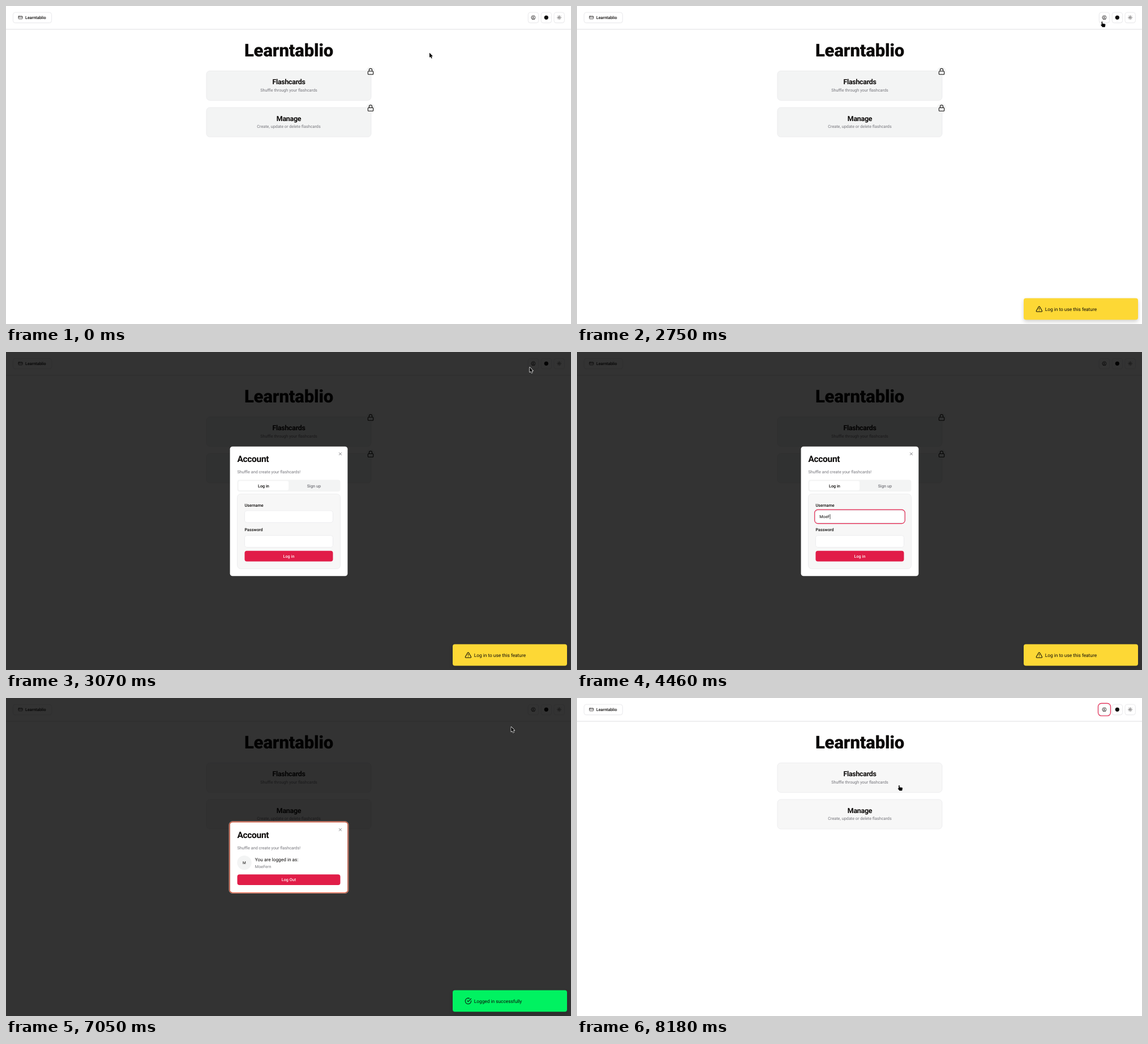
An HTML page with a canvas that plays this animation: 998x561 px, repeating every 8260 ms.

```html
<!DOCTYPE html>
<html lang="en">
<head>
<meta charset="utf-8">
<title>Flashcards login</title>
<style>
html, body { margin: 0; width: 100%; height: 100%; overflow: hidden; background: #fff; }
canvas { display: block; width: 998px; height: 561px; }
</style>
</head>
<body>
<canvas id="stage" width="998" height="561"></canvas>
<script>
const W = 998, H = 561, LOOP = 8260, STEP = 80;
const APP = 'Learntablio', USER = 'MoeFern';
const INK = '#0c0a09', GREY = '#76767c', LINE = '#e4e4e7', MUTED = '#f3f4f4',
      PANEL = '#f7f7f7', RED = '#e11d48';

const stage = document.getElementById('stage').getContext('2d');
const layer = Object.assign(document.createElement('canvas'), { width: W, height: H });
const dialogCtx = layer.getContext('2d');
let g = stage;

const ICONS = {
  card: 'M4 5H20a2 2 0 0 1 2 2V17a2 2 0 0 1-2 2H4a2 2 0 0 1-2-2V7a2 2 0 0 1 2-2ZM2 10h20',
  lock: 'M5 11H19a2 2 0 0 1 2 2v7a2 2 0 0 1-2 2H5a2 2 0 0 1-2-2v-7a2 2 0 0 1 2-2ZM7 11V7a5 5 0 0 1 10 0v4',
  user: 'M2 12a10 10 0 1 1 20 0a10 10 0 1 1-20 0M9 10a3 3 0 1 1 6 0a3 3 0 1 1-6 0M7 20.7V19a2 2 0 0 1 2-2h6a2 2 0 0 1 2 2v1.7',
  sun: 'M8 12a4 4 0 1 1 8 0a4 4 0 1 1-8 0M12 2v2M12 20v2M2 12h2M20 12h2M4.9 4.9l1.4 1.4M17.7 17.7l1.4 1.4M4.9 19.1l1.4-1.4M17.7 6.3l1.4-1.4',
  close: 'M18 6 6 18M6 6l12 12',
  spinner: 'M21 12a9 9 0 1 1-6.2-8.56',
  warn: 'm21.73 18-8-14a2 2 0 0 0-3.48 0l-8 14A2 2 0 0 0 4 21h16a2 2 0 0 0 1.73-3ZM12 9v4M12 17h.01',
  check: 'M22 11.08V12a10 10 0 1 1-5.93-9.14M22 4 12 14.01l-3-3'
};
for (const name in ICONS) ICONS[name] = new Path2D(ICONS[name]);

const ARROW = new Path2D('M0 0V8.5L1.9 6.8 3.4 10 4.8 9.4 3.4 6.3H6Z');
const HAND = new Path2D('M1.6 1Q2.4 -.3 3.2 1V4L7.6 4.7Q8.6 5 8.4 6.3L7.6 10.2H3L.2 6.6Q-.2 5.4 1.6 6Z');

const clamp = v => Math.min(1, Math.max(0, v));
const ease = p => p * p * (3 - 2 * p);
const mix = (a, b, p) => a + (b - a) * p;

function box(x, y, w, h, r, fill, stroke, lineWidth = 0.6) {
  g.beginPath();
  g.roundRect(x, y, w, h, r);
  if (fill) { g.fillStyle = fill; g.fill(); }
  if (stroke) { g.strokeStyle = stroke; g.lineWidth = lineWidth; g.stroke(); }
}

function disc(x, y, r, color) {
  g.fillStyle = color;
  g.beginPath();
  g.arc(x, y, r, 0, 7);
  g.fill();
}

// y is the middle of the capital letters
function text(str, x, y, { size = 7.28, weight = 400, color = INK, align = 'left', track = 0 } = {}) {
  g.font = `${weight} ${size}px Roboto, sans-serif`;
  g.letterSpacing = track + 'px';
  g.textRendering = 'geometricPrecision';
  g.textAlign = align;
  g.fillStyle = color;
  g.fillText(str, x, y + size * 0.35);
}

function icon(name, x, y, size, color = INK, turn = 0) {
  g.save();
  g.translate(x, y);
  g.rotate(turn);
  g.scale(size / 24, size / 24);
  g.translate(-12, -12);
  g.lineWidth = 2;
  g.lineCap = g.lineJoin = 'round';
  g.strokeStyle = color;
  g.stroke(ICONS[name]);
  g.restore();
}

function focusRing(x, y, w, h, r) {
  const gap = 1.85;
  box(x - gap, y - gap, w + 2 * gap, h + 2 * gap, r + gap, null, RED, 1.1);
}

function shadow(color, blur, dy) {
  g.shadowColor = color;
  g.shadowBlur = blur;
  g.shadowOffsetY = dy;
}

function navButton(x, w) {
  g.save();
  shadow('rgba(0,0,0,.06)', 1.5, 0.5);
  box(x, 11.2, w, 18.4, 4, '#fff', LINE);
  g.restore();
}

function menuCard(y, title, note, locked) {
  box(354, y, 291, 52, 6, locked ? MUTED : PANEL, LINE);
  text(title, 499.5, y + 19.6, { size: 12.48, weight: 600, align: 'center', track: -0.31 });
  text(note, 499.5, y + 33.8, { color: GREY, align: 'center' });
  if (locked) {
    disc(644, y + 1, 8, MUTED);
    icon('lock', 644, y + 1, 12.48);
  }
}

function page(locked, userFocused) {
  g.fillStyle = '#fff';
  g.fillRect(0, 0, W, H);
  g.fillStyle = '#dfdfe2';
  g.fillRect(0, 40.6, W, 1);
  navButton(12.5, 68);
  icon('card', 25.5, 20.3, 8.32);
  text(APP, 34, 20.4, { weight: 500 });
  [922.3, 945.2, 968].forEach(x => navButton(x, 18.4));
  icon('user', 931.4, 20.3, 8.32);
  disc(954.3, 20.3, 3.6, INK);
  icon('sun', 977.2, 20.3, 8.32);
  if (userFocused) focusRing(922.3, 11.2, 18.4, 18.4, 4);

  text(APP, 499.5, 78.2, { size: 31.2, weight: 800, align: 'center', track: -0.2 });
  menuCard(114.5, 'Flashcards', 'Shuffle through your flashcards', locked);
  menuCard(179, 'Manage', 'Create, update or delete flashcards', locked);
}

function dialogHead(y, h) {
  box(395.6, y, 207.8, h, 4.5, '#fff');
  text('Account', 408.5, y + 22.3, { size: 15.6, weight: 600, track: -0.39 });
  text('Shuffle and create your flashcards!', 408.5, y + 45.2, { color: GREY });
  icon('close', 590.5, y + 13, 8.32, '#44444a');
}

function caret(x, y) {
  g.fillStyle = INK;
  g.fillRect(x, y - 4.4, 0.7, 8.8);
}

function field(label, y, focused) {
  text(label, 421.5, y - 9.8, { weight: 500 });
  box(421.5, y, 156, 20.8, 4, '#fff', LINE);
  if (focused) focusRing(421.5, y, 156, 20.8, 4);
}

const KEY_TIMES = [4130, 4300, 4300, 4460, 4620, 4780, 4860];

function loginForm(t, now) {
  dialogHead(166.7, 228.6);
  box(408.5, 225.4, 182, 20.8, 4, MUTED);
  box(410.6, 227.5, 88.6, 16.6, 3, '#fff');
  text('Log in', 454.9, 236, { weight: 500, align: 'center' });
  text('Sign up', 543.9, 236, { weight: 500, align: 'center', color: GREY });

  box(408.5, 250.4, 182, 132, 6, PANEL, LINE);
  if (t >= 3400 && t < 3640) focusRing(408.5, 250.4, 182, 132, 6);

  const onName = t >= 3640 && t < 5100, onPassword = t >= 5100;
  field('Username', 280, onName);
  field('Password', 323.7, onPassword);

  const typed = USER.slice(0, KEY_TIMES.filter(k => t >= k).length);
  text(typed, 428.2, 290.5);
  if (onName) caret(428.3 + g.measureText(typed).width, 290.5);
  const dots = t >= 5430 ? 10 : 0;
  for (let i = 0; i < dots; i++) disc(430.6 + i * 4.4, 334.6, 1.75, INK);
  if (onPassword) caret(428.4 + dots * 4.4, 334.4);

  const busy = t >= 5760;
  box(421.5, 350.7, 156, 18.8, 4, busy ? '#ec8a9f' : RED);
  if (busy) icon('spinner', 485.4, 360.1, 8.32, '#fbe9ed', (now - 5760) / 1000 * Math.PI * 2);
  text('Log in', busy ? 507.7 : 499.5, 360.2,
    { weight: 500, align: 'center', color: busy ? '#fbe9ed' : '#fff1f2' });
}

function accountInfo() {
  dialogHead(219.3, 123.6);
  box(394.9, 218.6, 209.2, 125, 5.2, null, '#e95434', 1.2);
  box(394, 217.7, 211, 126.8, 6, null, '#f3c9bd', 0.6);
  disc(421, 290.6, 12.7, MUTED);
  text(USER[0], 421, 290.8, { size: 6.6, align: 'center' });
  text('You are logged in as:', 439.8, 285.2, { size: 8.32 });
  text(USER, 439.8, 297.2, { color: GREY });
  box(408.5, 311.2, 182, 18.8, 4, RED);
  text('Log Out', 499.5, 320.7, { weight: 500, align: 'center', color: '#fff1f2' });
}

function dialog(t, now, shown, loggedIn) {
  stage.fillStyle = `rgba(0,0,0,${0.8 * shown})`;
  stage.fillRect(0, 0, W, H);
  g = dialogCtx;
  g.clearRect(0, 0, W, H);
  g.save();
  const zoom = mix(0.95, 1, shown);
  g.translate(499.5, 281);
  g.scale(zoom, zoom);
  g.translate(-499.5, -281);
  loggedIn ? accountInfo() : loginForm(t, now);
  g.restore();
  g = stage;
  g.globalAlpha = shown;
  g.drawImage(layer, 0, 0);
  g.globalAlpha = 1;
}

function toast(color, glyph, message, dx, dy) {
  g.save();
  g.translate(dx, dy);
  g.save();
  shadow('rgba(0,0,0,.18)', 7, 3.5);
  box(789, 515.6, 202, 38, 4, color);
  g.restore();
  icon(glyph, 816.4, 534.6, 12.48);
  text(message, 826.8, 534.8, { size: 8.32 });
  g.restore();
}

// start, end, from x, from y, to x, to y
const LEGS = [
  [80, 800, 748, 82.5, 651.5, 115.3],
  [1710, 2590, 651.5, 115.3, 917, 32],
  [2590, 2750, 917, 32, 925, 27],
  [6970, 7050, 924, 27, 892.3, 51],
  [7460, 8180, 892.3, 51, 566.6, 153.4]
];

function cursor(t) {
  if (t >= 4130 && t < 6970) return;
  const [a, b, x0, y0, x1, y1] = LEGS.filter(leg => t >= leg[0]).pop() || LEGS[0];
  const p = ease(clamp((t - a) / (b - a)));
  const x = mix(x0, x1, p), y = mix(y0, y1, p);
  const hand = (t >= 2670 && t < 2990) || (t > 7460 && x < 641 && y > 112);
  const shape = hand ? HAND : ARROW;
  g.save();
  g.translate(x, y);
  g.lineJoin = 'round';
  g.lineWidth = 1.3;
  g.strokeStyle = '#fff';
  g.stroke(shape);
  g.fillStyle = '#000';
  g.fill(shape);
  g.restore();
}

// The picture holds for one step at a time, counted from each burst of motion
const BURSTS = [0, 160, 960, 1790, 2670, 2990, 5760, 6970, 7460];
function hold(t) {
  const start = BURSTS.filter(s => t >= s).pop();
  return start + STEP * Math.floor((t - start) / STEP);
}

function draw(now) {
  const t = hold(now);
  const loggedIn = t >= 6480;
  const closing = clamp((t - 7430) / 150);
  const shown = clamp((t - 2950) / 100) * (1 - closing);

  page(!loggedIn, closing === 1);
  if (shown > 0) dialog(now, t, shown, loggedIn);
  if (loggedIn) {
    if (closing < 1)
      toast('#00f261', 'check', 'Logged in successfully', 202 * closing, 38 * (1 - clamp((t - 6435) / 90)));
  } else if (t >= 960) {
    toast('#fdd835', 'warn', 'Log in to use this feature', 0, 38 * (1 - clamp((t - 915) / 90)));
  }
  cursor(now >= 4130 && now < 6970 ? now : t);
}

const origin = performance.now();
function tick() {
  draw((performance.now() - origin) % LOOP);
  requestAnimationFrame(tick);
}
tick();
</script>
</body>
</html>
```
